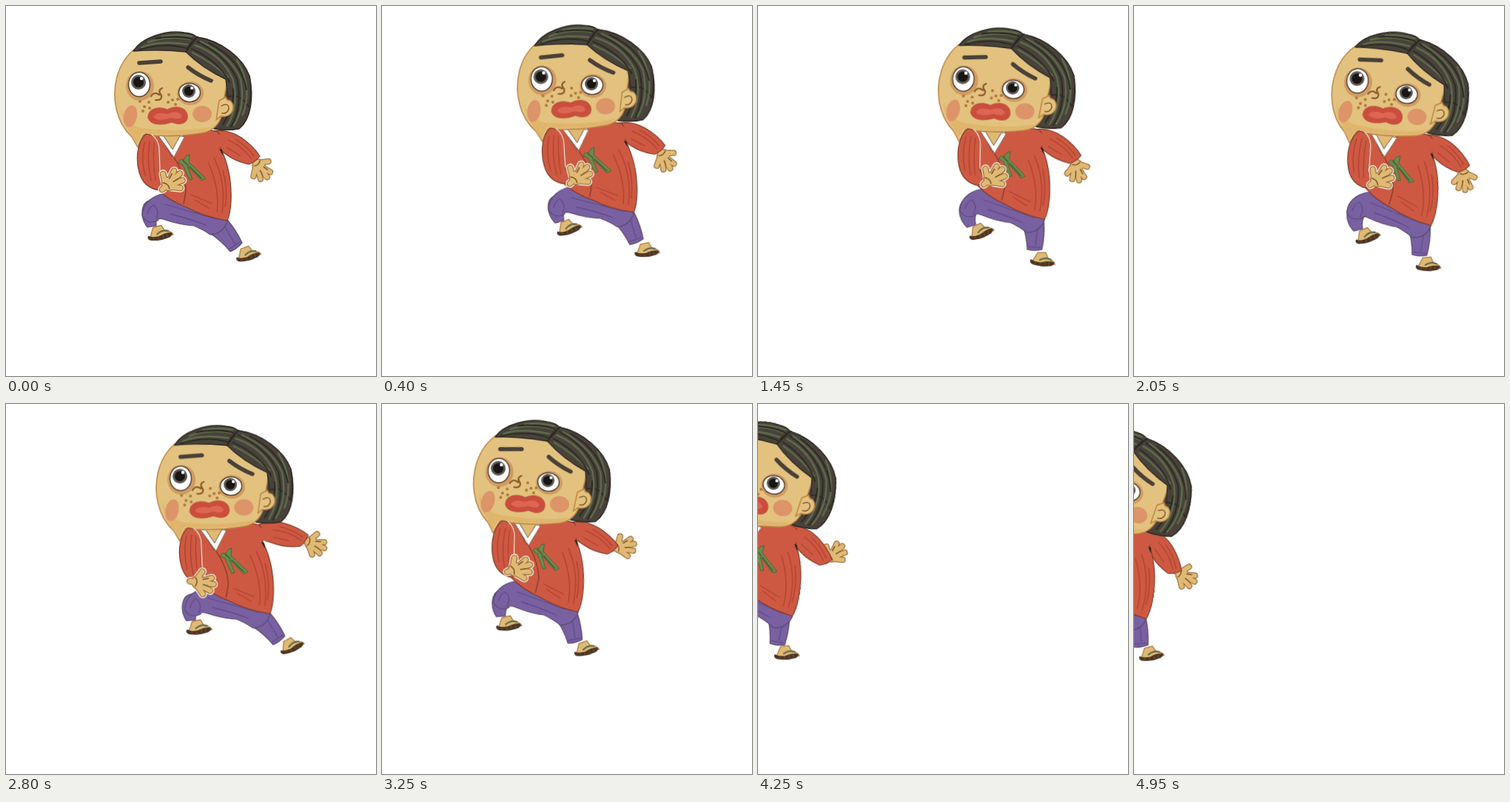
An HTML page without scripts for the animation above (5 s loop, 500 by 500 pixels).

```html
<!DOCTYPE html>
<html lang="en">
<head>
<meta charset="utf-8">
<title>Running character</title>
<style>
html, body { margin: 0; height: 100%; overflow: hidden; background: #fff; }
svg { display: block; width: 100%; height: 100%; }
path { stroke-linecap: round; stroke-linejoin: round; }

.skin { fill: #dfba74; stroke: #a9743a; stroke-width: 1.3; }
.face { fill: #e2c27e; stroke: #bd8344; stroke-width: 1.5; }
.red { fill: #ce5942; stroke: #7d3b28; stroke-width: 1.2; }
.purple { fill: #7960a1; stroke: #584a70; stroke-width: 1.2; }
.hair { fill: #48423a; stroke: #2f2a24; stroke-width: 1.5; }
.sole { fill: #4b3626; }
.line { fill: none; stroke-width: 1.3; }
.fold { stroke: #b0402f; }
.crease { stroke: #62498b; }
.strand { stroke: #5f6b4d; stroke-width: 2.4; }
.shade { stroke: #2b2822; stroke-width: 1.8; }
.ink { stroke: #7a4b26; }
.nose { stroke: #8d5b2c; stroke-width: 2.2; }
.freckle { stroke: #b1773c; stroke-width: 4; }
.brow { fill: none; stroke: #4a4038; stroke-width: 5.5; }
.cheek { fill: #dd9468; }
.green { fill: #6d8a4c; stroke: #4c6337; stroke-width: 1; }

/* moving parts share one loop */
.body, .head, .arm, .palm, .shin, .foot, .front-shin, .front-hand {
  animation: 5s linear infinite;
}
.body { transform-origin: 240px 190px; animation-name: run; }
.head { transform-origin: 222px 176px; animation-name: nod; }
.arm { transform-origin: 290px 182px; animation-name: swing; }
.palm { transform-origin: 335px 207px; animation-name: wave; }
.shin { transform-origin: 284px 298px; animation-name: kick; }
.foot { transform-origin: 312px 328px; animation-name: step; }
.front-shin { transform-origin: 196px 275px; animation-name: tuck; }
.front-hand { transform-origin: 222px 238px; animation-name: clutch; }

@keyframes run {
  0% { transform: none; }
  5% { transform: translate(22px, -6px) rotate(-1deg); }
  11% { transform: translate(55px, -13px) rotate(-2.2deg); }
  15% { transform: translate(56px, -15px) rotate(-2.4deg); }
  18% { transform: translate(57px, -13px) rotate(-2deg); }
  22% { transform: translate(70px, -11px) rotate(-.3deg); }
  33% { transform: translate(107px, -1px) rotate(5deg); }
  41% { transform: translate(113px, 1px) rotate(6deg); }
  44% { transform: translate(111px, 0) rotate(5.5deg); }
  50% { transform: translate(92px, -3px) rotate(2.5deg); }
  55% { transform: translate(65px, -5px) rotate(0deg); }
  56% { transform: translate(57px, -6px) rotate(-.5deg); }
  66% { transform: translate(-37px, -13px) rotate(4deg); }
  73% { transform: translate(-120px, -8.5px) rotate(7deg); }
  77% { transform: translate(-169px, -12px) rotate(7.4deg); }
  81% { transform: translate(-208px, -14px) rotate(8deg); }
  85% { transform: translate(-238px, -10.5px) rotate(8deg); }
  88% { transform: translate(-248px, -9px) rotate(8deg); }
  99%, 100% { transform: translate(-268px, -7px) rotate(8deg); }
}
@keyframes nod {
  0%, 41%, 56% { transform: none; }
  18%, 57% { transform: rotate(-1deg); }
  73%, 85% { transform: rotate(1.5deg); }
  99%, 100% { transform: translate(2px, 5px) rotate(2.5deg); }
}
@keyframes swing {
  0% { transform: none; }
  18% { transform: rotate(-5deg); }
  41% { transform: rotate(1deg); }
  56% { transform: rotate(-18deg) translateX(5px); }
  73%, 85% { transform: rotate(4deg); }
  99%, 100% { transform: translate(2px, 2px) rotate(16deg); }
}
@keyframes wave {
  0% { transform: none; }
  18%, 41% { transform: rotate(25deg); }
  56% { transform: rotate(-13deg); }
  73%, 85% { transform: rotate(-108deg); }
  99%, 100% { transform: rotate(-49deg); }
}
@keyframes kick {
  0%, 56% { transform: none; }
  18%, 41% { transform: translate(-3px, -5px) rotate(34deg); }
  73%, 85% { transform: translate(-6px, -6px) rotate(35deg); }
  99%, 100% { transform: translate(-3px, -6px) rotate(20deg); }
}
@keyframes step {
  0% { transform: none; }
  18% { transform: rotate(-10deg); }
  41% { transform: rotate(-25deg); }
  56% { transform: rotate(-8deg); }
  73%, 85% { transform: rotate(-32deg); }
  99%, 100% { transform: rotate(-23deg); }
}
@keyframes tuck {
  0% { transform: none; }
  18% { transform: translate(-2px, 5px) rotate(-13deg); }
  41% { transform: translate(0, 9px) rotate(-13deg); }
  56% { transform: translate(-3px, 0) rotate(4deg); }
  73%, 100% { transform: translate(0, 8px) rotate(-3deg); }
}
@keyframes clutch {
  0% { transform: none; }
  18% { transform: translate(6px, 2px); }
  41% { transform: translate(1px, -4px); }
  56% { transform: translate(-16px, 9px) rotate(50deg); }
  73%, 100% { transform: translate(-1px, -11px) rotate(-5deg); }
}
</style>
</head>
<body>
<svg viewBox="0 0 500 500">
  <defs>
    <path id="fingers" d="M0 0H9L25 -7M9 0L28 0M9 2L25 8M9 4L17 13M7 -2L13 -13"/>
    <g id="hand" fill="none">
      <use href="#fingers" stroke="#956331" stroke-width="7.6"/>
      <circle cx="10" r="8" fill="#dfba74" stroke="#956331"/>
      <use href="#fingers" stroke="#dfba74" stroke-width="5.6"/>
      <path class="line ink" d="M15 -4L21 -6M16 2L22 3M6 -5Q10 0 7 5"/>
    </g>
    <g id="shoe">
      <path class="skin" d="M-8 -10L4 -12L9 -3Q17 -3 20 3L-14 5Z"/>
      <path class="sole" d="M-16 1Q-10 5 0 3Q11 -2 18 0Q20 3 15 6Q0 11 -14 8Q-19 5 -16 1Z"/>
      <path class="line strand" d="M-3 0Q5 -6 13 -3"/>
      <path class="line ink" d="M-9 4V7M-2 4V8M5 2V6M11 1V5"/>
    </g>
  </defs>

  <g class="body">
    <g class="shin">
      <g class="foot"><use href="#shoe" transform="translate(326 336) rotate(-10) scale(.92)"/></g>
      <path class="purple" d="M274 306C270 291 287 281 299 289Q311 303 319 320Q312 328 303 332Q292 318 274 306Z"/>
      <path class="line crease" d="M296 299L309 321M302 328L316 319"/>
    </g>

    <g class="front-shin">
      <use href="#shoe" transform="translate(207 308) rotate(-6) scale(.94)"/>
      <path class="purple" d="M184 282Q183 263 198 262Q211 266 207 281Q202 288 203 297L191 299Q185 292 184 282Z"/>
    </g>
    <path class="purple" d="M222 252C199 254 184 266 184 284Q191 296 205 290Q206 286 212 288Q235 296 254 297Q268 303 276 309Q293 308 299 291L292 265Z"/>
    <path class="line crease" d="M199 269Q208 275 203 288M215 268Q249 278 284 288M222 281Q250 288 270 296M191 281Q193 272 199 269"/>

    <g class="arm">
      <g class="palm"><use href="#hand" transform="translate(335 207) rotate(54) scale(1.08)"/></g>
      <path class="red" d="M279 169Q300 166 318 178Q334 189 343 203Q337 211 328 214Q310 210 298 201L286 192Z"/>
      <path class="line fold" d="M300 181Q320 190 332 207M310 180Q325 189 335 203M298 191L316 202"/>
    </g>

    <path class="red" d="M194 172L208 176L224 203L240 175Q268 164 286 170Q293 178 290 192C302 217 305 240 304 264Q303 281 299 290Q268 285 244 272Q222 264 206 249Z"/>
    <path d="M282 171L299 178L297 193L289 190Z" fill="#ce5942"/>
    <path d="M288 193L293 202L292 194Z" fill="#2c211c"/>
    <path class="line fold" d="M281 205Q298 240 292 279M273 211Q289 246 285 278M293 222Q300 248 296 271M255 262L274 273M250 255L278 267"/>
    <path class="skin" d="M212 174L225 194L236 174Z"/>
    <path d="M206 175L213 176L225 194L235 176L241 177L227 204Z" fill="#fff" stroke="#8a7867"/>
    <path class="line" stroke="#7d3b28" d="M227 205Q243 229 243 250L240 267"/>

    <path class="line green" d="M243 207Q242 202 248 201"/>
    <path class="green" d="M240 208Q234 206 233 212L239 215L248 235L252 234L245 216L264 236L270 233L247 211L248 201Q242 202 240 208Z"/>
    <path class="line" stroke="#405431" d="M239 209L246 215M248 217L264 233"/>

    <g class="head">
      <path class="hair" d="M258 42C291 47 320 70 329 95C335 124 331 153 315 166Q298 169 281 166L286 110Z"/>
      <path class="face" d="M174 58C149 78 143 112 149 139Q154 162 170 177L178 191L186 174Q224 178 263 172Q283 169 290 152L300 95L245 50Z"/>
      <path d="M154 137Q166 166 190 166Q241 171 278 163L270 170Q223 176 184 172L177 186Q160 165 154 137Z" fill="#e0b56c"/>

      <path class="hair" d="M172 61C183 43 215 32 241 36Q253 37 258 42L243 62Q206 58 172 61Z"/>
      <path class="hair" d="M258 42C291 47 320 70 329 95Q333 116 328 137Q317 117 300 123L297 99Q265 84 243 62Z"/>
      <path class="line strand" d="M183 56Q206 46 245 52M192 49Q219 39 249 45M211 41Q232 37 251 41M255 53Q291 65 306 98Q316 133 299 162M263 48Q304 67 317 99Q324 136 308 161M252 63Q278 76 300 96M312 73Q334 109 320 147"/>
      <path class="line shade" d="M180 59Q216 49 243 57M202 44Q229 39 252 45M258 48Q298 67 312 99Q320 136 304 163M251 58Q288 75 302 103M274 50Q318 72 325 113M293 160Q309 135 307 112"/>
      <path class="line shade" d="M259 42Q248 50 243 62"/>
      <path class="face" d="M288 128L297 123Q298 128 303 128Q309 133 306 142Q301 151 290 149L284 154Z"/>
      <path class="line ink" d="M291 135Q301 130 301 139Q299 146 292 145"/>

      <path class="brow" d="M180 77L209 75"/>
      <path class="brow" d="M246 83Q260 94 277 101"/>

      <ellipse cx="181" cy="108" rx="19" ry="20" fill="#cf9c62"/>
      <ellipse cx="180" cy="106" rx="14.5" ry="16.5" fill="#fff" stroke="#5a4230" stroke-width="1.5"/>
      <circle cx="179" cy="103" r="10" fill="#605a54"/>
      <circle cx="179" cy="103" r="7" fill="#181614"/>
      <circle cx="183" cy="98" r="2.2" fill="#fff"/>
      <ellipse cx="249" cy="118" rx="18" ry="16" fill="#cf9c62"/>
      <ellipse cx="248" cy="117" rx="14.5" ry="12.5" fill="#fff" stroke="#5a4230" stroke-width="1.5"/>
      <circle cx="247" cy="115" r="9" fill="#605a54"/>
      <circle cx="247" cy="115" r="6.3" fill="#181614"/>
      <circle cx="251" cy="111" r="2" fill="#fff"/>

      <path class="line nose" d="M211 111Q204 114 210 121Q211 128 202 127M196 122Q200 115 207 120"/>
      <path class="line freckle" d="M181 129h0M187 136h0M193 130h0M185 142h0M194 138h0M220 120h0M225 127h0M219 130h0M232 126h0M229 133h0"/>

      <ellipse class="cheek" cx="168" cy="149" rx="9" ry="15" transform="rotate(12 168 149)"/>
      <ellipse class="cheek" cx="265" cy="146" rx="13" ry="11"/>
      <path d="M192 151C191 138 207 135 218 140C228 134 243 136 245 147C247 159 235 162 224 157C210 162 194 161 192 151Z" fill="#cb4d3d" stroke="#bb5a3c"/>
      <path d="M199 150Q204 142 218 146Q233 140 238 149Q235 155 223 151Q207 157 199 150Z" fill="#dd6652"/>
    </g>

    <path class="red" d="M189 173C179 181 174 203 180 225Q186 246 207 249L217 241Q210 231 207 226Q208 205 206 187Q203 174 189 173Z"/>
    <path class="line" stroke="#f3e6d3" d="M197 174Q207 181 207 195L208 226"/>
    <path class="line fold" d="M187 184Q182 206 188 229M194 183Q190 210 196 236M200 185Q198 211 202 235"/>

    <g class="front-hand">
      <use href="#fingers" transform="translate(211 248) rotate(-42) scale(1.15)" fill="none" stroke="#f5ecdc" stroke-width="10"/>
      <use href="#hand" transform="translate(211 248) rotate(-42) scale(1.15)"/>
    </g>
  </g>
</svg>
</body>
</html>
```
